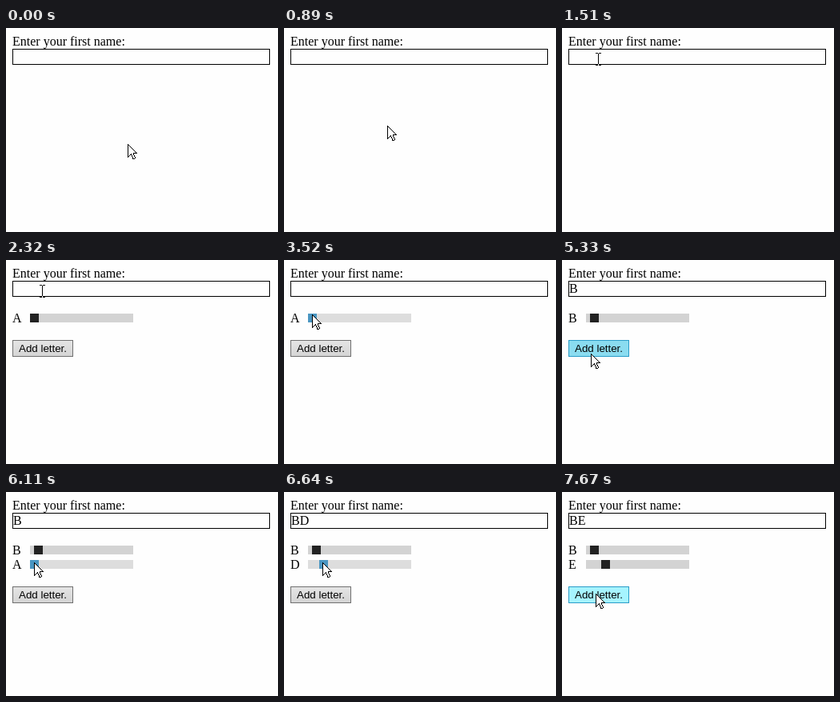
Recreate the animation shown at these times as an HTML page. Size 340 by 255 pixels, loop 8000 ms.

```html
<!DOCTYPE html>
<html lang="en">
<head>
<meta charset="utf-8">
<title>Name by slider</title>
<style>
  html, body { margin: 0; width: 100%; height: 100%; overflow: hidden; background: #fefefe; }
  svg { display: block; width: 340px; height: 255px; }
  text { font: 16px "Liberation Serif", "Times New Roman", serif; fill: #000; white-space: pre; }
  #button text { font: 13.333px "Liberation Sans", Arial, sans-serif; }
  #beam { mix-blend-mode: difference; }
</style>
</head>
<body>
<svg viewBox="0 0 340 255">
  <defs>
    <linearGradient id="grey" x2="0" y2="1">
      <stop offset="0" stop-color="#e5e5e5"/>
      <stop offset="1" stop-color="#d4d4d4"/>
    </linearGradient>
  </defs>
  <rect width="340" height="255" fill="#fefefe"/>
  <text x="8" y="22">Enter your first name:</text>
  <rect x="8.5" y="26.5" width="321" height="19" fill="none" stroke="#000"/>
  <text id="field" x="9" y="41"></text>
  <g id="rows"></g>
  <g id="button">
    <rect id="face" x="8.5" y=".5" width="75" height="20"/>
    <text x="16" y="15">Add letter.</text>
  </g>
  <path id="arrow" d="M.5 .5V16.5L4.5 12.5L7 18.5H8.5L9.5 17.5L7 11.5H11.5Z" fill="#fff" stroke="#000" stroke-linejoin="round" shape-rendering="crispEdges"/>
  <path id="beam" d="M-3 -7.5h3m1 0h3M.5 -7v14M-3 7.5h3m1 0h3" fill="none" stroke="#fff"/>
</svg>
<script>
const LOOP = 8000;
const TICK = 87; // the pointer moves in steps of this many ms
const LETTER_STEP = 118 / 25, GRAB_X = 35, ROW_GAP = 18, THUMB = 11;

const $ = id => document.getElementById(id);
const smooth = p => p * p * (3 - 2 * p);
const settle = p => 1 - (1 - p) ** 3;

const start = { x: 152, y: 145 };
const strokes = [
  { from: 710, to: 1510, x: 45, y: 39, ease: smooth },  // to the field
  { from: 3160, to: 3610, x: 35, y: 68, ease: settle }, // to the first slider
  { from: 3790, to: 3960, x: 38, y: 71, ease: smooth }, // drag to B
  { from: 4390, to: 4630, x: 36, y: 117, ease: settle }, // to the button
  { from: 5510, to: 5840, x: 35, y: 88, ease: settle }, // to the second slider
  { from: 6200, to: 6820, x: 50, y: 88, ease: smooth }, // drag to D
  { from: 7000, to: 7270, x: 55, y: 88, ease: smooth }, // drag on to E
  { from: 7590, to: 7670, x: 42, y: 127, ease: smooth } // back to the button
];

const sliders = [
  { shown: 2320, grab: 3790, drop: 4380 },
  { shown: 5510, grab: 6200, drop: 7580 }
];
const press = { from: 5330, to: sliders[1].shown };

function pointerAt(t) {
  let { x, y } = start;
  for (const s of strokes) {
    if (t < s.from) break;
    const length = s.to - s.from;
    const last = Math.round(length / TICK);
    const step = Math.min(last, Math.floor((t - s.from + 5) / length * last));
    const p = s.ease((step + 1) / (last + 1));
    x += (s.x - x) * p;
    y += (s.y - y) * p;
  }
  return { x: Math.round(x), y: Math.round(y) };
}

function letterIndex(slider, t) {
  if (t < slider.grab) return 0;
  const { x } = pointerAt(Math.min(t, slider.drop));
  return Math.max(0, Math.round((x - GRAB_X) / LETTER_STEP));
}

function add(parent, tag, attrs) {
  const el = document.createElementNS("http://www.w3.org/2000/svg", tag);
  for (const key in attrs) el.setAttribute(key, attrs[key]);
  return parent.appendChild(el);
}

sliders.forEach((s, i) => {
  s.y = 67 + i * ROW_GAP;
  s.group = add($("rows"), "g", {});
  s.label = add(s.group, "text", { x: 8, y: s.y + 11 });
  s.track = add(s.group, "rect", { x: 30, y: s.y, width: 129, height: THUMB });
  s.thumb = add(s.group, "rect", { y: s.y, width: THUMB, height: THUMB });
});

const within = (v, from, size) => v >= from && v < from + size;
const show = (el, on) => el.setAttribute("display", on ? "inline" : "none");
const place = (el, x, y) => el.setAttribute("transform", `translate(${x} ${y})`);

function drawSlider(s, t, y) {
  const index = letterIndex(s, t);
  const letter = String.fromCharCode(65 + index);
  const hover = within(y, s.y, THUMB);
  show(s.group, t >= s.shown);
  s.label.textContent = letter;
  s.track.setAttribute("fill", hover ? "#ddd" : "#d3d3d3");
  s.thumb.setAttribute("fill", hover ? "#4a96c2" : "#222");
  s.thumb.setAttribute("x", Math.round(30 + index * LETTER_STEP));
  return index ? letter : "";
}

function drawButton(t, y) {
  const rows = sliders.filter(s => t >= s.shown).length;
  const top = 82 + rows * ROW_GAP;
  const over = within(y, top, 21);
  const pressed = t >= press.from && t < press.to;
  show($("button"), rows > 0);
  place($("button"), 0, top);
  $("face").setAttribute("fill", pressed ? "#8adcf0" : over ? "#a6f4ff" : "url(#grey)");
  $("face").setAttribute("stroke", over ? "#2a9cc8" : "#707070");
}

function draw(t) {
  const { x, y } = pointerAt(t);
  $("field").textContent = sliders.map(s => drawSlider(s, t, y)).join("");
  drawButton(t, y);

  const inField = within(y, 26, 20);
  show($("beam"), inField);
  show($("arrow"), !inField);
  place($("beam"), x, y);
  place($("arrow"), x, y);
}

const began = performance.now();
function frame() {
  draw((performance.now() - began) % LOOP);
  requestAnimationFrame(frame);
}
frame();
</script>
</body>
</html>
```
